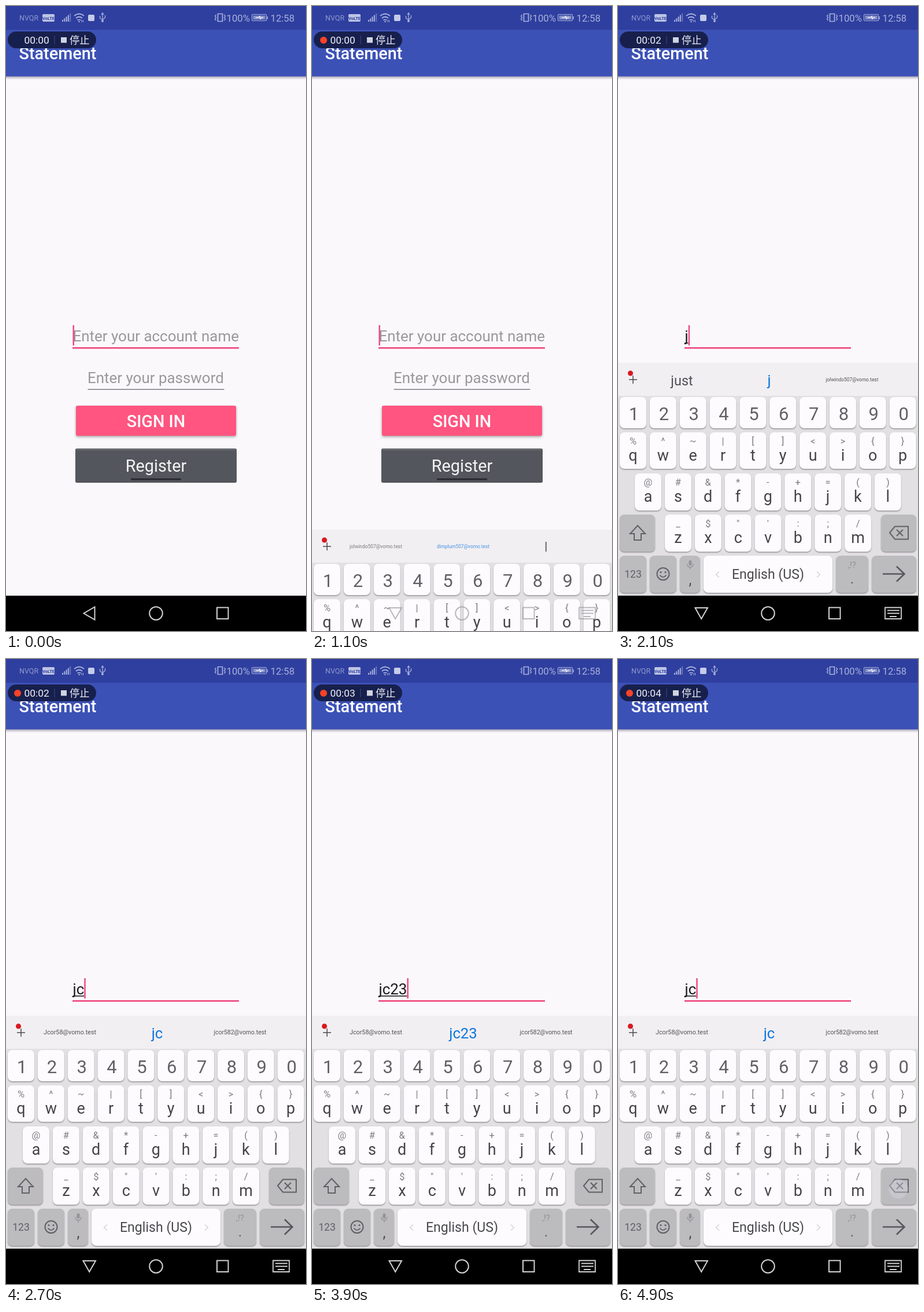
Animation of 519x1079 px, one loop 5000 ms. Source, as an HTML page with a canvas:

```html
<!DOCTYPE html>
<html lang="en">
<head>
<meta charset="utf-8">
<style>
  html, body { margin: 0; width: 100%; height: 100%; overflow: hidden; background: #fbf8fc; }
  canvas { display: block; }
</style>
</head>
<body>
<canvas id="stage" width="519" height="1079"></canvas>
<script>
const c = document.getElementById('stage').getContext('2d');
const LOOP = 5000, STEP = 100, W = 519, H = 1079;
const PINK = '#ee4b80', BLUE = '#0d76dd', GREY = '#bcbbbe', BODY = '#fbf8fc';
const FIELD = 25.95, BIG = 28.83;

// Typing: time, text in the field, pressed key
const strokes = [
  [-250, ''], [1900, 'j', 'j'], [2500, 'jc', 'c'], [3100, 'jc2', '2'],
  [3600, 'jc23', '3'], [4200, 'jc2', 'del'], [4800, 'jc', 'del']
];
const mailA = 'jolwindo507@vomo.test', mailB = 'dimplum507@vomo.test';
const mailC = 'Jcor58@vomo.test', mailD = 'jcor582@vomo.test';

function rect(x, y, w, h, color) {
  c.fillStyle = color;
  c.fillRect(x, y, w, h);
}

function box(x, y, w, h, r, color, blur = 0, drop = 0) {
  c.save();
  c.shadowColor = 'rgba(0,0,0,.35)';
  c.shadowBlur = blur;
  c.shadowOffsetY = drop;
  c.fillStyle = color;
  c.beginPath();
  c.roundRect(x, y, w, h, r);
  c.fill();
  c.restore();
}

function disc(x, y, r, color) {
  c.fillStyle = color;
  c.beginPath();
  c.arc(x, y, r, 0, 7);
  c.fill();
}

function path(d, color, width) {
  c.strokeStyle = color;
  c.lineWidth = width;
  c.stroke(new Path2D(d));
}

function ring(x, y, r, color, width) {
  path(`M${x - r} ${y}a${r} ${r} 0 1 1 ${2 * r} 0a${r} ${r} 0 1 1 ${-2 * r} 0`, color, width);
}

function text(s, x, y, size, color, align = 'left', weight = 400) {
  c.font = `${weight} ${size}px Roboto, "Noto Sans CJK SC", sans-serif`;
  c.textAlign = align;
  c.fillStyle = color;
  c.fillText(s, x, y);
  return c.measureText(s).width;
}

function statusBar() {
  const ink = '#a9b1dc';
  rect(0, 0, W, 41, '#2f3f9f');
  text('NVQR', 23, 25, 12.5, '#8f99cf');
  box(63, 14, 21, 13, 2, '#bdc4e6');
  text('VoLTE', 73.5, 23.5, 7.5, '#2f3f9f', 'center', 700);
  for (let i = 0; i < 5; i++) {
    const h = 3 + i * 2.8;
    rect(97 + i * 3.3, 27 - h, 2, h, i < 4 ? ink : '#6873b9');
  }
  path('M118 17q8.500-7 17 0M121 21q5.500-4.500 11 0M123.500 24.500q3-2 6 0', ink, 1.7);
  disc(126.500, 27, 1.3, ink);
  path('M131 24v4m2.500-4v4', ink, 1);
  box(142, 15, 11, 11, 2, '#c5cbe9');
  path('M167 13v14M162.500 17v4l4.500 3 4.500-4v-4M165 15l2-3 2 3', ink, 1.3);
  disc(167, 26, 2, ink);
  path('M366.500 13.500h8v13h-8z', ink, 1.7);
  path('M363.500 15l-2 2.500 2 2.500-2 2.500 2 2.500M377.500 15l2 2.500-2 2.500 2 2.500-2 2.500', ink, 1.3);
  text('100%', 381.500, 27, 16.7, ink);
  path('M427 14.500h22q1.500 0 1.500 1.500v8q0 1.500-1.500 1.500h-22q-1.500 0-1.500-1.500v-8q0-1.500 1.500-1.500z', ink, 1.1);
  rect(427.500, 16.500, 21, 7, '#8690cb');
  path('M432 20h5l2-2 1 4 2-2h3', '#e4e7f6', 1.7);
  rect(451.500, 18, 1.5, 5, ink);
  text('12:58', 457.500, 27, 16.7, ink);
}

function recorder(t) {
  const sec = Math.max(0, Math.floor((t - 130) / 980));
  box(3, 44, 153, 29, 14.5, '#17204d');
  if (t - 130 - sec * 980 >= 490) disc(20, 59, 6, '#fb4227');
  text('00:0' + sec, 31.5, 65, 17.4, '#f1f2f7');
  rect(83.5, 51, 1, 15, '#414a73');
  rect(95, 54, 10, 9.5, '#d2d4df');
  text('停止', 110, 65, 17.3, '#eceef5');
}

function form(typed, cursorOn) {
  if (typed) {
    const w = text(typed, 115.5, 579, FIELD, '#1b1a1d');
    rect(115.5, 581, w, 1.6, '#1b1a1d');
  } else {
    text('Enter your account name', 115.5, 579, FIELD, '#9b989c');
  }
  rect(115, 589, 288, 2.7, PINK);
  c.font = FIELD + 'px Roboto, sans-serif';
  if (cursorOn) rect(115.5 + c.measureText(typed).width, 551, 2.5, 35, PINK);

  text('Enter your password', 141, 651, FIELD, '#9b989c');
  rect(141.5, 661, 236, 1.6, '#858387');
  box(121, 690, 277, 52, 3, '#ff5580', 4, 2);
  text('SIGN IN', 259.5, 727, BIG, '#fff', 'center', 500);
  box(120, 764, 279, 59, 3, '#53565c', 1);
  rect(122, 765, 275, 1.5, '#73767b');
  text('Register', 259.5, 804, BIG, '#f5f5f7', 'center');
  box(216, 815.5, 87, 3, 1, '#292a2f');
}

// Letter keys, each with the small symbol above it
const keys = {};
[['1234567890', '', 3, 675, 54], ['qwertyuiop', '%^~|[]<>{}', 3, 736, 63],
 ['asdfghjkl', '@#&*-+=()', 29, 807, 64], ['zxcvbnm', '_$"\':;/', 81, 878, 64]
].forEach(([row, signs, x, y, h]) =>
  [...row].forEach((k, i) => keys[k] = { x: x + i * 51.85, y, h, sign: signs[i] }));

const key = (x, y, w, h, color) => box(x, y, w, h, 8, color, 2, 1.5);

function suggest(s, x, color, size) {
  c.font = size + 'px Roboto, sans-serif';
  const fit = size * Math.min(1, 91 / c.measureText(s).width);
  text(s, x, fit < 15 ? 648 : 654.5, fit, color, 'center');
}

function suggestions(typed, rising) {
  const dark = '#535156';
  path('M19 645h14M26 638v14', '#4c4a4e', 1.5);
  disc(21.5, 634, 4.5, '#d71920');
  const [left, mid, right] = typed === '' ? [mailA, mailB] :
    typed === 'j' ? ['just', 'j', mailA] : [mailC, typed, mailD];
  c.globalAlpha = rising ? .75 : 1;
  suggest(left, 110.5, dark, 23.5);
  suggest(mid, 261.5, BLUE, 25.7);
  if (right) suggest(right, 405, dark, 23.5);
  else rect(403.7, 637, 2.3, 17, dark);
  c.globalAlpha = 1;
}

function keyboard(typed, rising) {
  const ink = '#616064';
  rect(0, 616, W, 57, '#f2eff2');
  rect(0, 673, W, 470, '#e2e0e3');
  suggestions(typed, rising);
  for (const k in keys) {
    const { x, y, h, sign } = keys[k], mid = x + 23;
    key(x, y, 46, h, '#fdfbfe');
    if (sign) {
      text(sign, mid, y + 21, 16.5, '#7d7b80', 'center');
      text(k, mid, y + 49, 27, '#444347', 'center');
    } else {
      text(k, mid + 1.5, y + 40, 31, ink, 'center');
    }
  }
  key(3, 878, 61, 64, GREY);
  path('M34 897l13 14h-7v11h-12v-11h-7z', ink, 2);
  key(455, 878, 61, 64, GREY);
  path('M470 909.500l9-11h23v22h-23zM482 904l11 11m0-11l-11 11', ink, 2);

  [[3, 46], [55, 46], [107, 35], [377, 56], [439, 77]].forEach(([x, w]) => key(x, 949, w, 64, GREY));
  key(148, 949, 223, 64, '#fdfbfe');
  text('123', 26, 987, 17.6, ink, 'center');
  ring(78, 980.5, 10.5, ink, 2);
  disc(74, 977.5, 1.6, ink);
  disc(82, 977.5, 1.6, ink);
  path('M72.500 982.500q5.500 7 11 0', ink, 1.6);
  box(122.5, 957, 5, 9, 2.5, '#949397');
  path('M120 963q0 6 5 6t5-6M125 969v4', '#949397', 1.3);
  text(',', 125, 999, 25, '#4a494d', 'center');
  text('English (US)', 259.5, 989, 23.1, '#49484c', 'center');
  path('M175 976.500l-5.500 5 5.500 5M344 976.500l5.500 5-5.500 5', '#d3d1d5', 1.4);
  text(',!?', 405, 970, 15, '#929195', 'center');
  text('.', 405, 997, 23, '#5a595d', 'center');
  path('M458 980.500h37M482 967.500l13.500 13-13.500 13', '#58575b', 2.6);
}

function touch(name, age) {
  if (!name || age >= 200) return;
  if (name === 'del') {
    c.globalAlpha = age ? .35 : .7;
    disc(485, 915, 16, '#dedce8');
    ring(485, 915, 16, '#c8c5dc', 2);
    c.globalAlpha = 1;
    return;
  }
  const { x, y, h } = keys[name];
  box(x - 3.5, y - 59, 55, h + 57, 10, '#fdfcff', 6, 2);
  text(name, x + 24, y - 16, 29.5, BLUE, 'center');
  ring(x + 21, y + 22, 16, '#cbc8df', 2);
}

function navBar(open, clear) {
  const ink = clear ? 'rgba(150,148,153,.65)' : '#d2d2d2';
  if (!clear) rect(0, 1018, W, 61, '#000');
  path(open ? 'M133.500 1039h21.500l-10.800 19z' : 'M134.500 1048.500l19-11v22z', ink, 2);
  ring(259.5, 1048.5, 11.3, ink, 2);
  path('M365 1038.500h19.500v19.500h-19.500z', ink, 2);
  if (!open) return;
  path('M462 1038.500h28v19.500h-28z', ink, 1.8);
  path('M466 1043.500h21M466 1048.500h21', ink, 2.2);
  path('M470 1054h12', ink, 2);
}

function draw(t) {
  const [at, typed, pressed] = strokes.findLast(s => s[0] <= t);
  const rising = t >= 1000 && t < 1200;
  rect(0, 0, W, H, BODY);
  const shade = c.createLinearGradient(0, 121, 0, 127);
  shade.addColorStop(0, 'rgba(40,40,70,.4)');
  shade.addColorStop(1, 'rgba(40,40,70,0)');
  rect(0, 121, W, 6, shade);
  rect(0, 40, W, 81.5, '#3c51b6');
  statusBar();
  text('Statement', 22.5, 92, BIG, '#fff', 'left', 500);
  recorder(t);
  form(typed, (t - at) % 1000 < 500);
  if (t >= 1000) {
    const u = Math.min(1, (t - 950) / 250);
    c.save();
    c.translate(0, 450 * (1 - u * u));
    keyboard(typed, rising);
    touch(pressed, t - at);
    c.restore();
  }
  navBar(t >= 900, rising);
}

function tick() {
  draw(Math.floor(performance.now() % LOOP / STEP) * STEP);
  requestAnimationFrame(tick);
}
tick();
</script>
</body>
</html>
```
